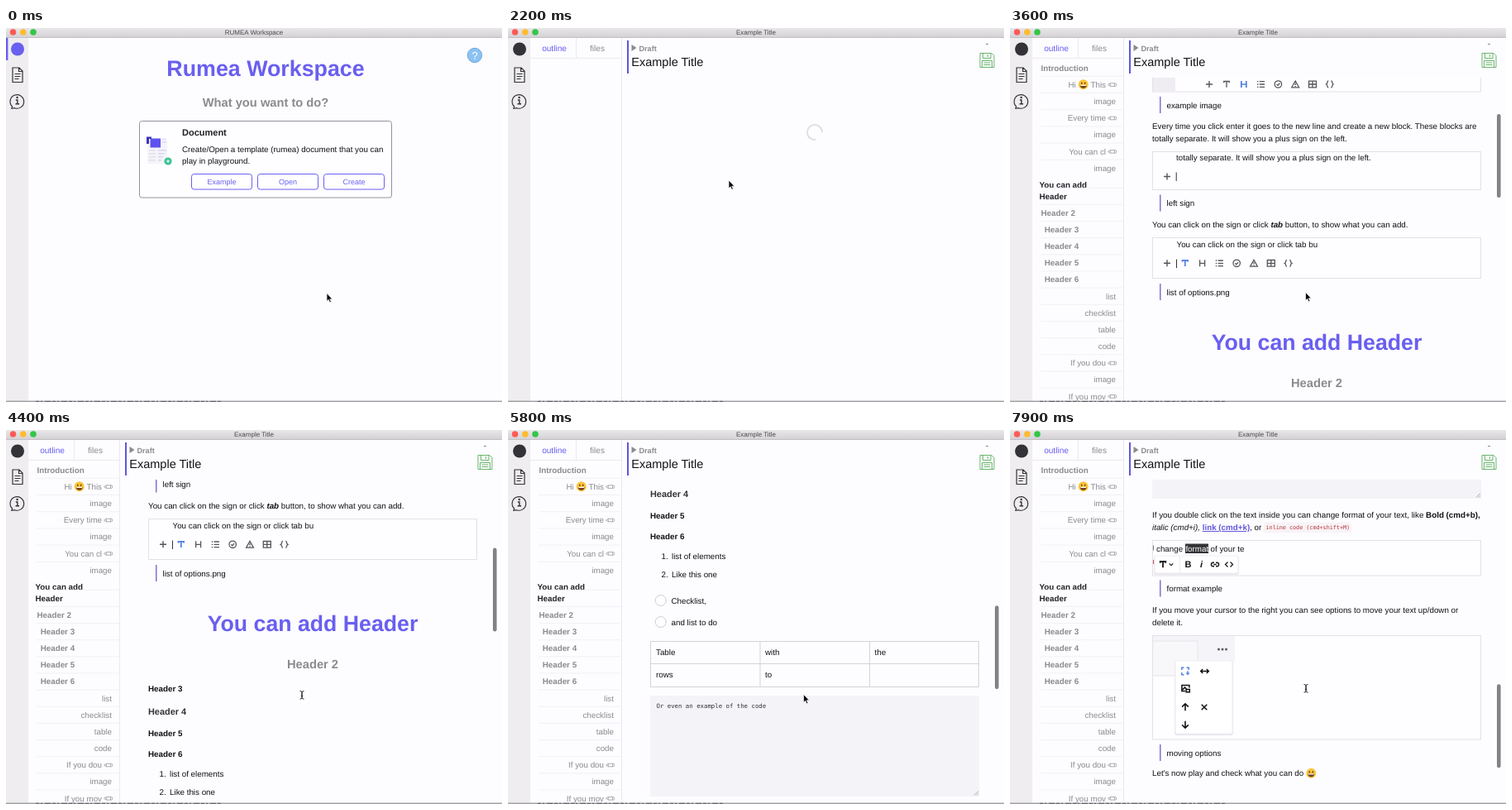
Write an HTML page that moves like this. It is 600x452 px and loops after 8 s.

```html
<!DOCTYPE html>
<html lang="en">
<head>
<meta charset="utf-8">
<title>Workspace</title>
<style>
html, body { margin: 0; width: 600px; height: 452px; overflow: hidden; background: #fdfcff; }
svg { display: block; }
text { font-family: "Liberation Sans", Arial, sans-serif; text-rendering: geometricPrecision; white-space: pre; }
.mono { font-family: "DejaVu Sans Mono", monospace; }
.b { font-weight: bold; }
.i { font-style: italic; }
</style>
</head>
<body>
<svg id="stage" width="600" height="452" viewBox="0 0 600 452"></svg>
<script>
const VIOLET = '#695ff0', LINK = '#6157dc', INK = '#121214', GREY = '#8b8a8e', EDGE = '#e3e1e7';
const $ = id => document.getElementById(id);

// Markup helpers
const text = (x, y, size, str, fill = INK, cls = '', anchor = 'start') =>
  `<text x="${x}" y="${y}" font-size="${size}" fill="${fill}" class="${cls}" text-anchor="${anchor}">${str}</text>`;
const rect = (x, y, w, h, fill, stroke = 'none', r = 0) =>
  `<rect x="${x}" y="${y}" width="${w}" height="${h}" rx="${r}" fill="${fill}" stroke="${stroke}"/>`;
const path = (d, stroke, w = 1, fill = 'none') =>
  `<path d="${d}" stroke="${stroke}" stroke-width="${w}" fill="${fill}"/>`;
const dot = (x, y, r, fill, stroke = 'none', w = 1) =>
  `<circle cx="${x}" cy="${y}" r="${r}" fill="${fill}" stroke="${stroke}" stroke-width="${w}"/>`;
const at = (x, y, s) => `<g transform="translate(${x} ${y})">${s}</g>`;
const group = (id, s, attrs = '') => `<g id="${id}" ${attrs}>${s}</g>`;
const span = (cls, s, fill = INK) => `<tspan class="${cls}" fill="${fill}">${s}</tspan>`;
const body = (x, y, s) => text(x, y, 9.8, s);

const ring = 'M-4.2 0a4.2 4.2 0 1 0 8.4 0a4.2 4.2 0 1 0-8.4 0';
const icons = {
  plus: 'M-4 0h8M0-4v8',
  T: 'M-3.3-1.8v-1.7h6.6v1.7M0-3.5v7.3',
  H: 'M-3-4v8M3-4v8M-3 0h6',
  list: 'M-1.8-3.3h6.3M-1.8 0h6.3M-1.8 3.3h6.3M-4.6-3.3h1.4M-4.6 0h1.4M-4.6 3.3h1.4',
  check: ring + 'M-1.9 0l1.5 1.4 2.3-2.6',
  warn: 'M0-4l4.4 7.8h-8.8zM0-1.2v2.2M0 2v.9',
  table: 'M-4.5-3.8h9v7.6h-9zM-4.5 0h9M0-3.8v7.6',
  braces: 'M-1.6-4c-2.2 0-.6 3.2-2.6 4 2 .8.4 4 2.6 4M1.6-4c2.2 0 .6 3.2 2.6 4-2 .8-.4 4-2.6 4',
  link: 'M-1-2.2h-1.4a2.2 2.2 0 0 0 0 4.4h1.4M1-2.2h1.4a2.2 2.2 0 0 1 0 4.4h-1.4M-1.8 0h3.6',
  angle: 'M-1.5-3l-3 3 3 3M1.5-3l3 3-3 3',
  down: 'M-2.3-1.2l2.3 2.3 2.3-2.3',
  wide: 'M-4.8 0h9.6M-2.3-2.5l-2.5 2.5 2.5 2.5M2.3-2.5l2.5 2.5-2.5 2.5',
  up: 'M0 4.3v-8.3M-3.8-.4l3.8-3.8 3.8 3.8',
  low: 'M0-4.3v8.3M-3.8.4l3.8 3.8 3.8-3.8',
  cross: 'M-3.3-3.3l6.6 6.6M3.3-3.3l-6.6 6.6',
  frame: 'M-4.2-1.6v-2.6h2.6M1.6-4.2h2.6v2.6M-4.2 1.6v2.6h2.6M1 2.6h4M3-.2v5',
  swap: 'M4.4-1v-3h-9v7h4M-4 1.5l3-3 2 2M.6 1h4.2v3.2h-4.2z'
};
const icon = (name, x, y, color = '#55555b', w = 1.4) => at(x, y, path(icons[name], color, w));

const smile = (x, y, r = 6) => at(x, y, dot(0, 0, r, '#fbc53a') +
  `<ellipse cx="-2" cy="-1.6" rx=".8" ry="1.3" fill="#6a4317"/><ellipse cx="2" cy="-1.6" rx=".8" ry="1.3" fill="#6a4317"/>` +
  path('M-3.8 .6h7.6a3.8 3.8 0 0 1-7.6 0z', 'none', 0, '#6a3c18') + path('M-3.3 1.2h6.6', '#fff', 1.1));
const pencil = (x, y) => at(x, y, path('M-5 0l2.8-1.8h6.2q1 0 1 1v1.6q0 1-1 1h-6.2zM-2.2-1.8v3.6M3-1.8v3.6', '#9b9a9e', .8));

// Window frame
const chrome = () =>
  rect(0, 0, 600, 452, '#fdfcff') + rect(0, 12, 27, 440, '#efedf0') +
  rect(0, 0, 600, 11, 'url(#bar)') + rect(0, 11, 600, 1, '#c2c0c3') +
  dot(8.5, 5, 3.8, '#fc5b57') + dot(20.8, 5, 3.8, '#fdbc2f') + dot(33, 5, 3.8, '#34c648') +
  `<text id="caption" x="300" y="8" font-size="8" fill="#4b494c" text-anchor="middle"></text>` +
  `<circle id="mark" cx="14" cy="25.5" r="8"/>` +
  path('M8 48h8l4 4v13.500h-12zM15.500 48v4.500h4.500M10.500 55.500h7M10.500 58.500h7M10.500 61.500h5', '#333236', 1.2) +
  path('M7.5 94.800a8.300 8.300 0 1 1 3 1.900l-3.700 .6z', '#333236', 1.2) +
  dot(13.6, 84, 1.2, '#333236') + path('M11.8 87h2v4.500M11.500 91.700h4.500', '#333236', 1.4);

const button = (x, label) => rect(x + .5, 176.5, 73, 18.500, '#fff', VIOLET, 3) +
  text(x + 37, 189.2, 9, label, VIOLET, '', 'middle');

const home = () =>
  rect(0, 12, 2.4, 27, VIOLET) +
  text(314, 58, 26.8, 'Rumea Workspace', VIOLET, 'b', 'middle') +
  text(314, 95, 14.7, 'What you want to do?', GREY, 'b', 'middle') +
  dot(567, 33, 8.700, '#8cc2f2', '#6fa9e0') + text(567, 37.8, 13, '?', '#fff', '', 'middle') +
  rect(161.5, 112.5, 305, 92.500, '#fefdff', '#93929c', 3) +
  rect(171, 136, 24, 28, '#f5f4f8') +
  [147, 151, 155, 159].map((y, i) => rect(173, y, 8, 1.6, '#e3e2ee') + rect(184, y, 10 - i * 2, 1.6, '#d9d7f3')).join('') +
  path('M170 140v-8.500h6v2.500h-3v6z', 'none', 0, '#3d36b8') + rect(174.500, 133.500, 12.5, 11, '#5d52ee') +
  path('M189 134.500h5M189 138h5', '#dcdaf6', 1.4) +
  dot(196, 161, 4.6, '#3bc394') + path('M194 161h4M196 159v4', '#fff', 1) +
  text(213, 130, 11, 'Document', '#222126', 'b') +
  body(213, 150, 'Create/Open a template (rumea) document that you can') +
  body(213, 163.6, 'play in playground.') +
  button(224, 'Example') + button(304, 'Open') + button(384, 'Create');

const editorFrame = () =>
  path('M137.500 12v439M82.500 12v24M27 36.500h110', '#ebe9ef') +
  text(56, 27.5, 10.1, 'outline', VIOLET, '', 'middle') + text(108, 27.5, 10.1, 'files', GREY, '', 'middle') +
  rect(144, 15, 2, 40, LINK) + path('M149.500 20l6 4-6 4z', 'none', 0, '#8a898d') +
  text(158.5, 27.5, 9.1, 'Draft', GREY, 'b') + text(149.3, 46, 14.5, 'Example Title') +
  rect(578, 19, 3, 1, '#8a898d') +
  path('M571 30.500h14l3 3v14h-17zM574.500 30.500v6h9.500v-6M580.500 32v3M573.500 47v-7.500h12v7.500M575.500 42h8M575.500 44.500h8', '#69b56c', 1);

function outline() {
  const rows = 'Hi       This*,image,Every time*,image,You can cl*,image,,,#Header 3,#Header 4,#Header 5,#Header 6,list,checklist,table,code,If you dou*,image,If you mov*'.split(',');
  let s = text(37.5, 51.5, 9.8, 'Introduction', GREY, 'b') +
    text(35.5, 193, 9.8, 'You can add', '#222126', 'b') + text(35.5, 206.5, 9.8, 'Header', '#222126', 'b') +
    text(37.5, 226.8, 9.8, 'Header 2', GREY, 'b') + smile(88.7, 68.3);
  rows.forEach((row, i) => {
    const y = i < 6 ? 68.3 + i * 20.2 : 243.5 + (i - 8) * 20.15;
    s += path(`M37 ${y - 10}h100`, '#f0eef3', .8);
    if (!row) return;
    if (row[0] === '#') s += text(41.7, y + 3.5, 9.8, row.slice(1), GREY, 'b');
    else if (row.endsWith('*')) {
      const label = row.slice(0, -1);
      s += (i ? text(116, y + 3.5, 9.8, label, GREY, '', 'end')
        : text(70.5, y + 3.5, 9.8, 'Hi', GREY) + text(116, y + 3.5, 9.8, 'This', GREY, '', 'end')) + pencil(123.5, y + .3);
    } else s += text(128, y + 3.5, 9.8, row, GREY, '', 'end');
  });
  return s;
}

const frame = (y0, y1) => rect(172.5, y0, 397, y1 - y0, '#fefdff', EDGE);
const quote = (y, s) => rect(181, y - 10, 1.5, 20, '#7a74cf') + body(189.5, y + 3.7, s);
const tools = (x, y, active) => ['T', 'H', 'list', 'check', 'warn', 'table', 'braces']
  .map((name, i) => icon(name, x + i * 20.8, y, name === active ? '#4f7fe0' : '#55555b', name === active ? 1.7 : 1.3)).join('');
const popup = (x, y, w, h) => rect(x - 1, y, w + 2, h + 2, '#e9e7ee', 'none', 3) + rect(x, y, w, h, '#fff', '#efedf3', 2);

function article() {
  const H = (y, s, size = 9.8, fill = INK) => text(172, y, size, s, fill, 'b');
  return text(371, -78, 14.7, 'Introduction', GREY, 'b', 'middle') +
    body(172, -50, 'Hi') + smile(190, -53.500) + body(199, -50, 'This is an example of the document.') +
    frame(-30.500, 77) + rect(173, -30, 27, 106.500, '#efedf2') +
    icon('plus', 241, 68) + tools(262, 68, 'H') + quote(93, 'example image') +
    body(172, 121.7, 'Every time you click enter it goes to the new line and create a new block. These blocks are') +
    body(172, 137, 'totally separate. It will show you a plus sign on the left.') +
    frame(149.5, 195.5) + body(201, 159.8, 'totally separate. It will show you a plus sign on the left.') +
    icon('plus', 190, 179.500) + rect(200.7, 174.500, 1, 10.500, '#333') + quote(211.5, 'left sign') +
    body(172, 241, 'You can click on the sign or click ' + span('b i', 'tab') + ' button, to show what you can add.') +
    frame(253.5, 302.5) + body(201.5, 265, 'You can click on the sign or click tab bu') +
    icon('plus', 190, 284.3) + rect(201, 279.5, 1, 10.5, '#333') + tools(211.8, 284.3, 'T') +
    quote(319, 'list of options.png') +
    text(371, 389, 26.7, 'You can add Header', VIOLET, 'b', 'middle') +
    text(371, 434, 14.7, 'Header 2', GREY, 'b', 'middle') +
    H(461.500, 'Header 3') + H(490, 'Header 4', 10.9, '#333236') + H(515.7, 'Header 5') + H(541.3, 'Header 6') +
    body(185.5, 564.700, '1.') + body(198, 564.700, 'list of elements') +
    body(185.5, 586.8, '2.') + body(198, 586.8, 'Like this one') +
    dot(184.7, 615, 6.5, '#fefdff', '#d0ced5') + body(197.5, 618.6, 'Checklist,') +
    dot(184.7, 641, 6.5, '#fefdff', '#d0ced5') + body(197.5, 644.6, 'and list to do') +
    path('M172.500 664.500h397v55h-397zM172.500 691.500h397M305 664.500v55M437.500 664.500v55', '#d5d3d9') +
    body(179, 680.5, 'Table') + body(311, 680.5, 'with') + body(443.5, 680.5, 'the') +
    body(179, 708, 'rows') + body(311, 708, 'to') +
    rect(172, 730, 398, 122, '#f4f3f7') + path('M564 850.500l5-5M567 850.500l2-2', '#8f8e94', .8) +
    text(179.5, 744.7, 7.35, 'Or even an example of the code', '#333236', 'mono') +
    body(172, 874.6, 'If you double click on the text inside you can change format of your text, like ' + span('b', 'Bold (cmd+b),')) +
    body(172, 890, span('i', 'italic (cmd+i), ') + `<tspan class="b" fill="${LINK}" text-decoration="underline">link (cmd+k)</tspan>, or`) +
    rect(307, 880.500, 106, 12.5, '#f8f3f6', 'none', 2) +
    text(309.5, 889.4, 6.75, 'inline code (cmd+shift+M)', '#b5363a', 'mono') +
    frame(902.5, 945) + rect(173, 908.500, 1, 6, '#777') + body(177, 916, 'change') +
    rect(212, 906.5, 28, 11.5, '#333236') + text(212.4, 916, 9.8, 'format', '#fff') + body(242.5, 916, 'of your te') +
    rect(173, 926, 1.200, 5, '#c4585c') + popup(175, 921, 101, 21) +
    icon('T', 185, 931.5, '#1b1b1e', 1.8) + icon('down', 195, 931.5, '#1b1b1e', 1.2) + rect(205, 921, 1, 21, '#ebe9ef') +
    text(215.5, 935.4, 11, 'B', INK, 'b', 'middle') + text(231.5, 935.4, 11, 'i', INK, 'i b', 'middle') +
    icon('link', 248, 931.500, '#1b1b1e', 1.4) + icon('angle', 265, 931.500, '#1b1b1e', 1.3) +
    quote(960.5, 'format example') +
    body(172, 989.6, 'If you move your cursor to the right you can see options to move your text up/down or') +
    body(172, 1005, 'delete it.') +
    frame(1017.5, 1143) + rect(173, 1018, 99, 32, '#f5f4f8') + path('M173 1066h54v-42h-54', '#e6e4ea', 1, '#f8f7fa') +
    dot(252.500, 1034, 1.5, '#5a595f') + dot(257, 1034, 1.5, '#5a595f') + dot(261.500, 1034, 1.5, '#5a595f') +
    popup(200, 1048, 69, 88) +
    icon('frame', 212, 1060.5, '#4f7fe0', 1.4) + icon('wide', 235.5, 1060.500, '#111', 1.5) + icon('swap', 212.5, 1081.5, '#111', 1.5) +
    icon('up', 212, 1104, '#111', 1.6) + icon('cross', 235, 1104, '#111', 1.5) + icon('low', 212, 1125, '#111', 1.6) +
    quote(1159, 'moving options') +
    body(172, 1187.3, "Let's now play and check what you can do") + smile(364.3, 1183.8);
}

$('stage').innerHTML =
  `<defs><linearGradient id="bar" x2="0" y2="1"><stop stop-color="#e9e7ea"/><stop offset="1" stop-color="#d4d2d5"/></linearGradient>
  <clipPath id="view"><rect x="138" y="60" width="462" height="391"/></clipPath></defs>` +
  chrome() + group('home', home()) + group('editor', editorFrame() +
    group('spin', path('M380 126a9 9 0 1 0-7.500 8.900', '#dedce4', 1.8)) +
    group('loaded', outline() + group('port', group('doc', article()), 'clip-path="url(#view)"') +
      `<rect id="thumb" x="589" width="4.600" height="101" rx="2.300" fill="#838287"/>`)) +
  rect(0, 450.5, 600, 1.5, '#a3a1a5') +
  `<path d="M36 451.300H262" stroke="#5d5c60" stroke-width="1" stroke-dasharray="4 2 2 3 7 2"/>` +
  group('arrow', path('M0 0v9.800l2.200-2 1.500 3.500 1.700-.7-1.500-3.400h3z', '#fff', .7, '#0b0b0c')) +
  group('beam', path('M-2.500-4.800q2.500 0 2.500 1.500v6.600q0 1.500-2.500 1.500M2.500-4.800q-2.500 0-2.500 1.500v6.600q0 1.500 2.500 1.500M-1.200 1h2.400', '#2a2a2d', 1));

// Smooth curve through [time, value] stops
function curve(stops, t) {
  const n = stops.length;
  if (t <= stops[0][0]) return stops[0][1];
  if (t >= stops[n - 1][0]) return stops[n - 1][1];
  const k = stops.findIndex(p => p[0] > t) - 1;
  const slope = i => i <= 0 ? 0 : (stops[Math.min(i + 1, n - 1)][1] - stops[i - 1][1]) / (stops[Math.min(i + 1, n - 1)][0] - stops[i - 1][0]);
  const [ta, a] = stops[k], [tb, b] = stops[k + 1], d = tb - ta, u = (t - ta) / d, v = 1 - u;
  return a * v * v * (1 + 2 * u) + b * u * u * (3 - 2 * u) + d * u * v * (v * slope(k) - u * slope(k + 1));
}
const ease = (t, a, b) => { const u = Math.min(1, Math.max(0, (t - a) / (b - a))); return u * u * (3 - 2 * u); };
const scrollStops = [[2900, 0], [3600, 170], [4400, 316], [5800, 579], [6800, 832], [7900, 939]];
const show = (id, on) => $(id).setAttribute('display', on ? 'inline' : 'none');
const move = (id, x, y) => $(id).setAttribute('transform', `translate(${x} ${y})`);

function draw(t) {
  const open = t >= 1400, loaded = t >= 2300;
  show('home', !open);
  show('editor', open);
  show('spin', !loaded);
  show('loaded', loaded);
  $('caption').textContent = open ? 'Example Title' : 'RUMEA Workspace';
  $('mark').setAttribute('fill', open ? '#333236' : VIOLET);
  $('spin').setAttribute('transform', `rotate(${(t - 2200) * .36} 371 126)`);

  const y = curve(scrollStops, t);
  move('doc', 0, 170 - y);
  $('thumb').setAttribute('y', 59 + y * .2645);
  show('thumb', t >= 3000);

  const go = ease(t, 0, 1000), nudge = ease(t, 900, 1200), back = ease(t, 2200, 2800);
  const cx = 388 - 126 * go + 5 * nudge + 90.5 * back;
  const cy = 320.5 - 133 * go - 3.500 * nudge + 135.5 * back - 8 * ease(t, 7000, 7400);
  const typing = (t >= 4000 && t < 5200) || t >= 7000;
  show('arrow', !typing);
  show('beam', typing);
  move('arrow', cx, cy);
  move('beam', cx + .5, cy + .8);
}

function tick() {
  draw(Math.floor(performance.now() % 8000 / 100) * 100);
  requestAnimationFrame(tick);
}
tick();
</script>
</body>
</html>
```
